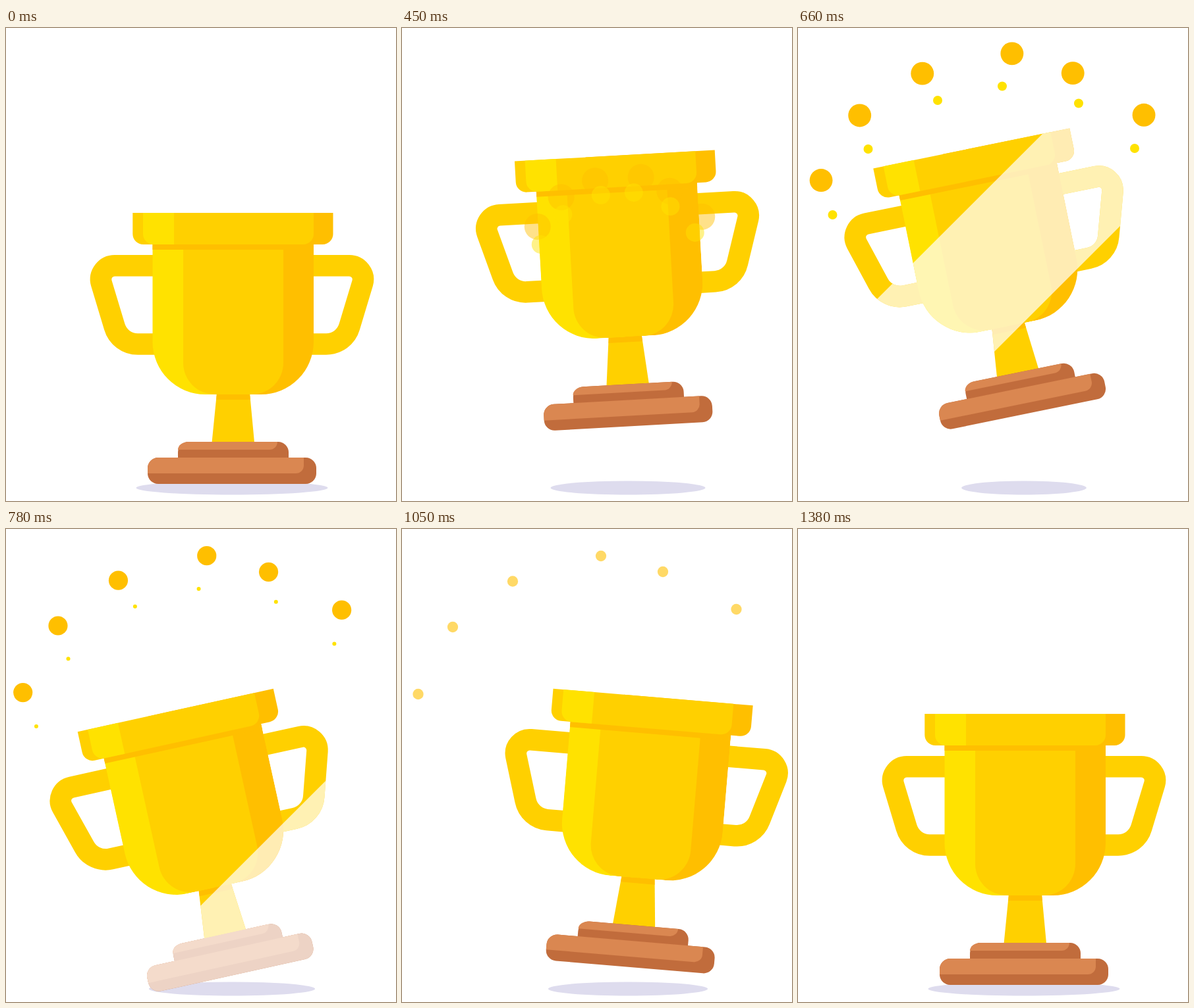
An HTML page that plays this animation: 592x719 px, repeating every 2.16 s.

```html
<!DOCTYPE html>
<html lang="en">
<head>
<meta charset="utf-8">
<title>Trophy</title>
<style>
  html, body { margin: 0; width: 100%; height: 100%; overflow: hidden; background: #fff; }
  svg { display: block; width: 592px; height: 719px; }
  mask { mask-type: alpha; }
  .gold { fill: #ffd000; }
  .light { fill: #ffe200; }
  .deep { fill: #ffbf00; }
  .wood { fill: #da8751; }
  .bark { fill: #c16c3c; }
  .handle { fill: none; stroke: #ffd000; stroke-width: 32.5; }
</style>
</head>
<body>
<svg viewBox="0 0 592 719">
  <defs>
    <path id="handle" class="handle" d="M228 361.2H165A21 21 0 0 0 144.8 387.9L164.7 454A36.75 36.75 0 0 0 200 480.5H228"/>
    <clipPath id="bowl"><path d="M222.5 325H467V477A80 80 0 0 1 387 557H302.5A80 80 0 0 1 222.5 477Z"/></clipPath>
    <mask id="silhouette" maskUnits="userSpaceOnUse" x="0" y="0" width="592" height="719"><use href="#cup"/></mask>
  </defs>

  <ellipse id="shadow" cx="343" cy="699" ry="10.5" fill="#dedcee"/>

  <g id="cup">
    <use href="#handle"/>
    <use href="#handle" transform="matrix(-1 0 0 1 686 0)"/>

    <path class="gold" d="M320 555H370L377 630H312.5Z"/>
    <path class="deep" d="M320 555H370L370.8 565H319.2Z"/>

    <g clip-path="url(#bowl)">
      <path class="light" d="M222 325H345V557H222Z"/>
      <path class="deep" d="M345 325H468V557H345Z"/>
      <path class="gold" d="M269 325H421V509A48 48 0 0 1 373 557H317A48 48 0 0 1 269 509Z"/>
      <path class="deep" d="M222 325H468V337H222Z"/>
    </g>

    <path class="deep" d="M300 281H496.5V313A16 16 0 0 1 480.5 329H300Z"/>
    <path class="gold" d="M192.3 281H467V313A16 16 0 0 1 451 329H208.3A16 16 0 0 1 192.3 313Z"/>
    <path class="light" d="M208 281H255V329H224A16 16 0 0 1 208 313Z"/>

    <path class="bark" d="M261 654V645A16 16 0 0 1 277 629H413A16 16 0 0 1 429 645V654Z"/>
    <path class="wood" d="M261 641A16 12 0 0 1 277 629H412A12 12 0 0 1 400 641Z"/>
    <rect class="bark" x="215" y="653" width="256" height="40" rx="16"/>
    <path class="wood" d="M215 677V669A16 16 0 0 1 231 653H452V665A12 12 0 0 1 440 677Z"/>
  </g>

  <g mask="url(#silhouette)"><path id="shine" fill="#fff" fill-opacity=".7"/></g>
  <g id="sparks"></g>
</svg>

<script>
const LOOP = 2160, STEP = 30, START = 300, LAST = 36;
const CENTER = { x: 348, y: 414 };

// Tracks are [step, value] pairs joined by sine easing.
const tracks = {
  x: [[0, 0], [5, 0.3], [14, -2.8], [19, -2.5], [26, 4], [36, 0]],
  y: [[0, 0], [9, -149], [17, -9], [19, -8.5], [26, -28], [36, 0]],
  tilt: [[0, 0], [15, -12.8], [26, 5.2], [36, 0]],
  shadow: [[0, 145.5], [10, 89.5], [20, 145.5], [27, 115.5], [36, 145.5]],
  spread: [[0, 0], [10, 1]],
  swirl: [[0, 14], [18, 0]]
};

// Spark places relative to CENTER once the burst is fully open.
const bigPlaces = [[-323.5, -163], [-271, -265], [-180, -334.5], [-46, -373], [48, -349], [159.5, -292]];
const smallPlaces = [[-295.5, -130], [-241.5, -230], [-136, -304], [-38, -325.5], [78, -299.5], [163, -231]]
  .map(p => rotate(p, -3.5));

const $ = id => document.getElementById(id);
const cup = $('cup'), shadow = $('shadow'), shine = $('shine'), sparks = $('sparks');
const clamp = (v, lo, hi) => Math.min(hi, Math.max(lo, v));

function rotate([x, y], degrees) {
  const a = degrees * Math.PI / 180, c = Math.cos(a), s = Math.sin(a);
  return [x * c - y * s, x * s + y * c];
}

function sample(keys, n) {
  const i = keys.findIndex(k => k[0] > n);
  if (i < 0) return keys[keys.length - 1][1];
  const [n0, v0] = keys[i - 1], [n1, v1] = keys[i];
  return v0 + (v1 - v0) * (1 - Math.cos(Math.PI * (n - n0) / (n1 - n0))) / 2;
}

function makeSparks(places, className) {
  return places.map(place => {
    const dot = document.createElementNS('http://www.w3.org/2000/svg', 'circle');
    dot.setAttribute('class', className);
    sparks.append(dot);
    return { dot, place };
  });
}
const big = makeSparks(bigPlaces, 'deep');
const small = makeSparks(smallPlaces, 'light');

function placeSparks(list, spread, swirl, radius, opacity) {
  for (const { dot, place } of list) {
    const [x, y] = rotate(place, swirl);
    dot.setAttribute('cx', CENTER.x + x * spread);
    dot.setAttribute('cy', CENTER.y + y * spread);
    dot.setAttribute('r', radius);
    dot.setAttribute('opacity', opacity);
  }
}

function draw(ms) {
  const n = clamp(Math.floor((ms - START) / STEP), 0, LAST);
  const at = name => sample(tracks[name], n);

  cup.setAttribute('transform', `translate(${at('x')} ${at('y')}) rotate(${at('tilt')} 343 673)`);
  shadow.setAttribute('rx', at('shadow'));

  const left = 532 + 84 * (n - 12), right = left + 258;
  shine.setAttribute('d', `M${left} 0H${right}L${right - 719} 719H${left - 719}Z`);

  const spread = at('spread'), swirl = at('swirl');
  const fadeIn = 0.85 * spread + 0.15 * spread * spread;
  const fadeOut = clamp(1 - 0.05 * (n - 17), 0, 1);
  placeSparks(big, spread, swirl, Math.min(20, 0.715 * (36.4 - n)), fadeIn * fadeOut);
  placeSparks(small, spread, swirl, clamp(19 - n, 0, 19), fadeIn);
}

let origin = null;
function tick(now) {
  origin ??= now;
  draw((now - origin) % LOOP);
  requestAnimationFrame(tick);
}
draw(0);
requestAnimationFrame(tick);
</script>
</body>
</html>
```
